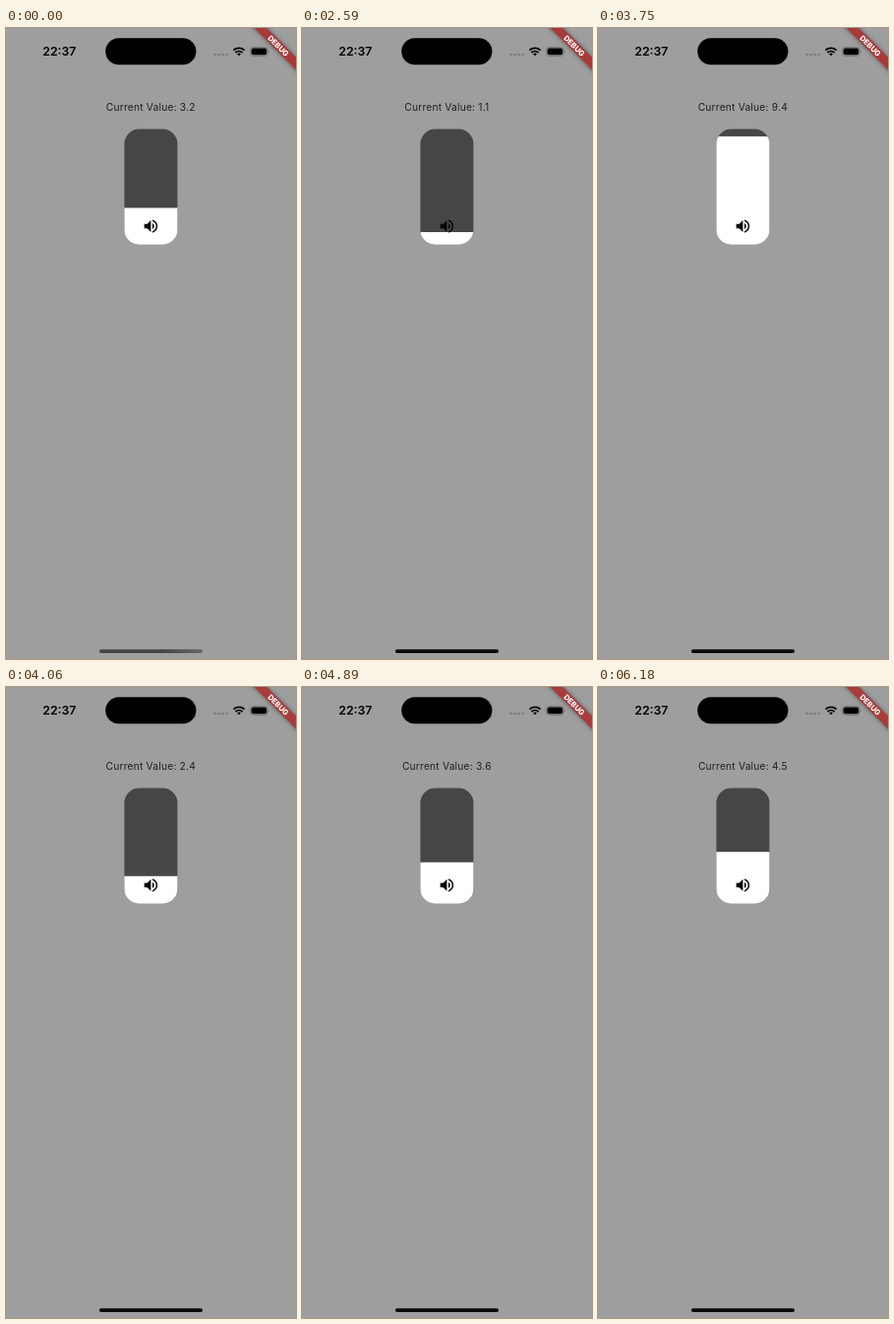
Animation of 295x640 px, one loop 7.71 s. Source, as an HTML page:

```html
<!DOCTYPE html>
<html lang="en">
<head>
<meta charset="utf-8">
<title>Volume slider</title>
<style>
  html, body { margin: 0; width: 100%; height: 100%; overflow: hidden; background: #9e9e9e; }
  svg { display: block; width: 295px; height: 640px; font-family: Inter, "Noto Sans", sans-serif; }
  .debug { filter: drop-shadow(0 0 2px rgba(0, 0, 0, .5)); }
</style>
</head>
<body>
<svg viewBox="0 0 295 640" text-anchor="middle">
  <defs>
    <clipPath id="pill"><rect x="120.4" y="102.6" width="54" height="117.1" rx="15"/></clipPath>
    <linearGradient id="dim"><stop offset=".6" stop-color="#444"/><stop offset="1" stop-color="#666"/></linearGradient>
  </defs>

  <!-- status bar -->
  <text x="54.3" y="28.2" font-size="12.3" font-weight="600">22:37</text>
  <rect x="101.2" y="10.2" width="92.2" height="27.1" rx="13.5"/>
  <path d="M212.6 27h12.2" stroke="#737373" stroke-width="2.3" stroke-linecap="round" stroke-dasharray="0 4"/>
  <path d="M231.4 22.7a8.1 8.1 0 0 1 11.2 0M233.5 25a5.1 5.1 0 0 1 7 0" fill="none" stroke="#000" stroke-width="1.8"/>
  <path d="M235.1 26.3a2.9 2.9 0 0 1 3.8 0L237 28.3z"/>
  <rect x="248.4" y="19.4" width="18" height="9" rx="3" fill="none" stroke="#707070" stroke-width=".8"/>
  <rect x="249.6" y="20.6" width="15.6" height="6.6" rx="1.9"/>
  <path d="M267.4 22.4q1.4 1.5 0 3z" fill="#707070"/>

  <!-- debug ribbon -->
  <g transform="translate(295 0) rotate(45)">
    <rect class="debug" x="-50" y="21" width="100" height="9" fill="#a83a3a"/>
    <text y="28.3" font-size="7.6" font-weight="800" fill="#fff">DEBUG</text>
  </g>

  <!-- slider -->
  <text id="label" x="147.3" y="84.3" font-size="10.2" letter-spacing=".22" fill="#202020"></text>
  <g clip-path="url(#pill)">
    <rect x="120" y="102" width="55" height="118" fill="#464646"/>
    <rect id="level" x="120" width="55" height="118" fill="#fff"/>
  </g>
  <path transform="translate(138.4 192.1) scale(.75)" fill="#080808"
    d="M3 9v6h4l5 5V4L7 9H3zm13.5 3c0-1.77-1.02-3.29-2.5-4.03v8.05c1.48-.73 2.5-2.25 2.5-4.02zM14 3.23v2.06c2.89.86 5 3.54 5 6.71s-2.11 5.85-5 6.71v2.06c4.01-.91 7-4.49 7-8.77s-2.99-7.86-7-8.77z"/>

  <rect id="home" x="94.9" y="630.2" width="105.1" height="3.8" rx="1.9"/>
</svg>
<script>
  const LOOP = 7710, BOTTOM = 219.9, UNIT = 11.7;
  const TICK = 115, BEAT = 207, SHAKE = 4060;
  // slider values as the finger shakes up and down, one per beat
  const shakes = [2.4, 5.8, 1.8, 6.1, 3.6, 5.6, 5.1, 6.5, 6.8, 2.7, 4.5];
  const [label, level, home] = ["label", "level", "home"].map(id => document.getElementById(id));

  // moves from a to b in equal jumps, one per tick
  const creep = (a, b, jumps, ms) => a + (b - a) * Math.min(1, Math.floor(ms / TICK) / jumps);

  function valueAt(t) {
    if (t < 2010) return 3.2;
    if (t < 3390) return creep(1.6, 1, 6, t - 2010);
    if (t < 3510) return .9;
    if (t < SHAKE) return creep(8.6, 9.4, 2, t - 3510);
    const beat = Math.floor((t - SHAKE) / BEAT);
    return shakes[Math.min(beat, shakes.length - 1)];
  }

  function draw(t) {
    const value = valueAt(t);
    label.textContent = "Current Value: " + value.toFixed(1);
    level.setAttribute("y", BOTTOM - value * UNIT);
    home.setAttribute("fill", t < 2130 ? "url(#dim)" : "#0a0a0a");
  }

  const start = performance.now();
  function tick() {
    draw((performance.now() - start) % LOOP);
    requestAnimationFrame(tick);
  }
  tick();
</script>
</body>
</html>
```
